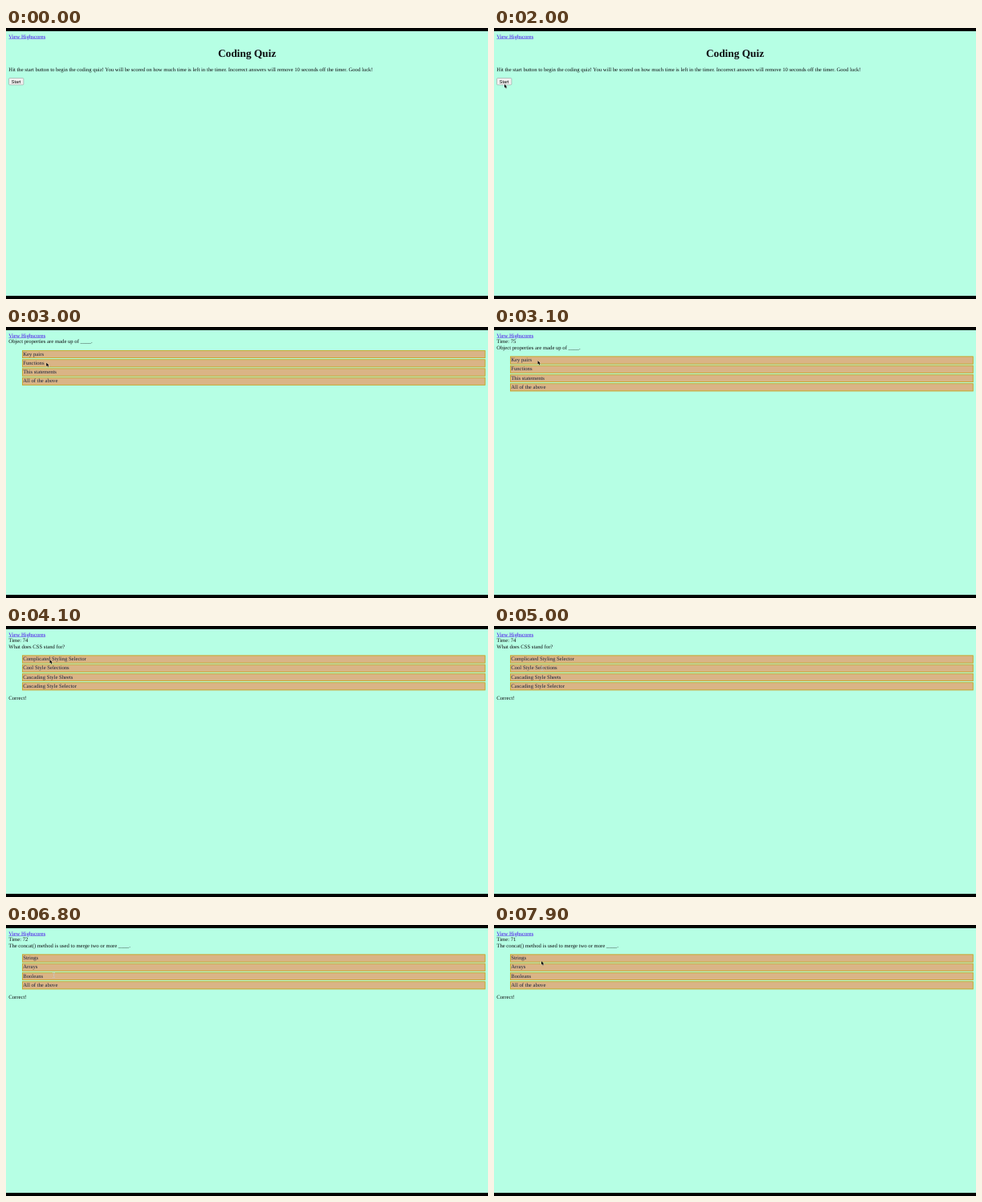
An HTML page that plays this animation: 600x338 px, repeating every 8 s.

```html
<!DOCTYPE html>
<html lang="en">
<head>
<meta charset="utf-8">
<title>Coding Quiz</title>
<style>
  html, body { margin: 0; width: 100%; height: 100%; overflow: hidden; background: #000; }
  #stage { position: absolute; left: 0; top: 0; width: 600px; height: 338px; overflow: hidden; background: #000; }
  /* laid out at 1440 wide, shown at 600 */
  #page {
    position: absolute; left: 0; top: 3.5px; width: 1440px; height: 792px;
    box-sizing: border-box; padding: 8px; overflow: hidden;
    transform: scale(.416667); transform-origin: 0 0;
    background: #b6ffe4; color: #0c0c10;
    font: 16px/18px "Liberation Serif", "Times New Roman", serif;
    text-rendering: geometricPrecision;
  }
  #page > * { white-space: nowrap; }
  .link { color: #40e; text-decoration: underline; }
  h1 { margin: 21.4px 0; font-size: 32px; line-height: 37px; text-align: center; }
  p { margin: 16px 0; }
  .button {
    box-sizing: border-box; width: 45px; height: 21px;
    border: 1px solid #777; border-radius: 3px; background: #f2f0f0; color: #000;
    font: 13.33px/19px "Liberation Sans", Arial, sans-serif; text-align: center;
  }
  ul { margin: 16px 0; padding: 0 0 0 40px; list-style: none; }
  li { margin-bottom: 3px; padding: 1px; border: 2px solid #c0ac28; background: #dab486; color: #18223c; }
  li:last-child { margin-bottom: 0; }
  [hidden] { display: none; }
  #pointer { position: absolute; left: 0; top: 0; width: 10px; height: 10px; overflow: visible; }
</style>
</head>
<body>
<div id="stage">
  <div id="page">
    <div><span class="link">View Highscores</span></div>
    <div id="intro">
      <h1>Coding Quiz</h1>
      <p>Hit the start button to begin the coding quiz! You will be scored on how much time is left in the timer. Incorrect answers will remove 10 seconds off the timer. Good luck!</p>
      <div class="button">Start</div>
    </div>
    <div id="quiz" hidden>
      <div id="timer"></div>
      <div id="question"></div>
      <ul id="answers"></ul>
      <div id="result">Correct!</div>
    </div>
  </div>
  <svg id="pointer" viewBox="0 0 10 10">
    <path id="arrow" d="M0 0V4.6L1.1 3.6L1.9 5.4L2.7 5L1.9 3.4H3.3Z" fill="#000" stroke="#fff" stroke-width=".45" paint-order="stroke"/>
    <g id="beam" fill="none" stroke-linecap="round">
      <path d="M-1 -3Q0 -3 0 -2.3V2.3Q0 3 -1 3M1 -3Q0 -3 0 -2.3M0 2.3Q0 3 1 3" stroke="#eee2d0" stroke-width=".9"/>
      <path d="M-.8 -3Q0 -3 0 -2.3V2.3Q0 3 -.8 3M.8 -3Q0 -3 0 -2.3M0 2.3Q0 3 .8 3" stroke="#8d8378" stroke-width=".3"/>
    </g>
  </svg>
</div>
<script>
const LOOP = 8000, STEP = 100, START = 2100;

const questions = [
  { at: START, text: 'Object properties are made up of ____.',
    answers: ['Key pairs', 'Functions', 'This statements', 'All of the above'] },
  { at: 4000, text: 'What does CSS stand for?',
    answers: ['Complicated Styling Selector', 'Cool Style Selections', 'Cascading Style Sheets', 'Cascading Style Selector'] },
  { at: 5900, text: 'The concat() method is used to merge two or more ____.',
    answers: ['Strings', 'Arrays', 'Booleans', 'All of the above'] }
];

// time, x, y
const path = [
  [400, 355, 110], [600, 250, 100], [900, 60, 80], [1100, 16, 71], [1300, 13, 70],
  [2300, 13, 70], [2700, 26, 62], [2900, 46, 47], [3100, 54.5, 42],
  [4500, 54.5, 42], [4700, 59, 49], [5000, 60, 53], [5500, 60, 61], [5700, 59.5, 64],
  [6700, 59.5, 64], [7200, 60, 57], [7800, 60, 57], [7900, 59, 45]
];
const beamFrom = 4600, beamTo = 7900;

const $ = id => document.getElementById(id);
let shown;

function pointerAt(t) {
  const next = path.findIndex(p => p[0] > t);
  if (next < 0) return path[path.length - 1].slice(1);
  const [t0, x0, y0] = path[next - 1], [t1, x1, y1] = path[next];
  const k = (t - t0) / (t1 - t0);
  return [x0 + (x1 - x0) * k, y0 + (y1 - y0) * k];
}

function showQuestion(index) {
  if (index === shown) return;
  shown = index;
  $('intro').hidden = index >= 0;
  $('quiz').hidden = index < 0;
  if (index < 0) return;
  const { text, answers } = questions[index];
  $('question').textContent = text;
  $('answers').replaceChildren(...answers.map(answer => {
    const item = document.createElement('li');
    item.textContent = answer;
    return item;
  }));
  $('result').hidden = index === 0;
}

function render(t) {
  showQuestion(questions.filter(q => q.at <= t).length - 1);

  const ticks = Math.floor((t - START) / 1000);
  $('timer').hidden = ticks < 1;
  $('timer').textContent = 'Time: ' + (76 - ticks);

  const visible = t >= path[0][0];
  $('pointer').style.display = visible ? '' : 'none';
  if (!visible) return;
  const [x, y] = pointerAt(t);
  const beam = t >= beamFrom && t < beamTo;
  $('pointer').style.transform = `translate(${x}px, ${y}px)`;
  $('arrow').style.display = beam ? 'none' : '';
  $('beam').style.display = beam ? '' : 'none';
}

const begin = performance.now();
function frame() {
  const t = (performance.now() - begin) % LOOP;
  render(Math.floor(t / STEP) * STEP);
  requestAnimationFrame(frame);
}
frame();
</script>
</body>
</html>
```
